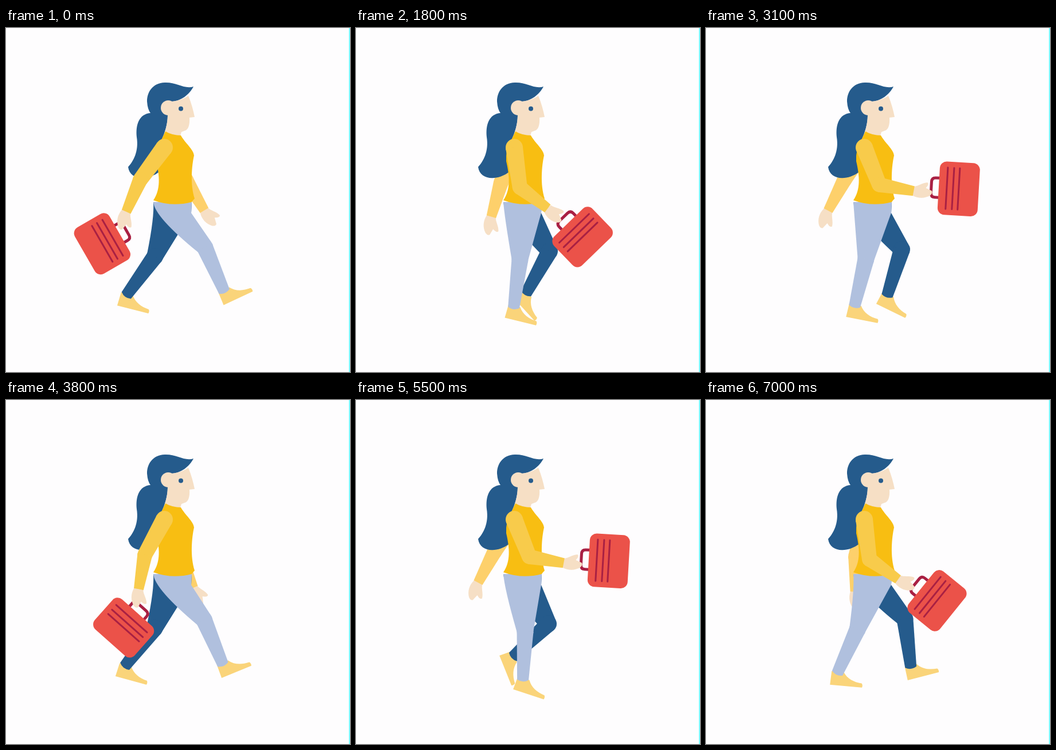
These frames come from a looping animation (600x599 px, 7100 ms). An HTML page with a canvas:

```html
<!DOCTYPE html>
<html lang="en">
<head>
<meta charset="utf-8">
<title>Walking with a suitcase</title>
<style>
  html, body { margin: 0; width: 100%; height: 100%; overflow: hidden; background: #fefdfe; }
  canvas { display: block; width: 600px; height: 599px; }
</style>
</head>
<body>
<canvas id="stage" width="600" height="599"></canvas>
<script>
const ctx = document.getElementById('stage').getContext('2d');
const NAVY = '#255b8c', PALE = '#b0c0de', SKIN = '#f6dfc5', SHOE = '#fad47a';
const SHIRT = '#f8be12', NEAR = '#f8cb4b', FAR = '#fdd06b', BAG = '#eb5249', TRIM = '#a92043';
const STEP = 100, STEPS = 71;

// Rows: time in steps, then thigh, shin and foot angle for the near and the far leg.
const half = [
  [0, 41.7, 23.8, -25, -20.8, -36.3, 14.3],
  [1.5, 33, 18, -5, -24, -50, 22],
  [3, 20, 9, 8, 5, -62, 50],
  [4.6, 3.4, -2.7, 18, 32.4, -47, 68],
  [5.4, -2.7, -7.4, 13.5, 34, -29.1, 47.5],
  [5.8, -7.5, -13.5, 11.3, 37.3, -17.6, 26],
  [7, -17.6, -24.7, 5, 42, 7, -14.5]
];
const swap = ([t, a, b, c, d, e, f]) => [7.2 + t * 0.74, d, e, f, a, b, c];
const LEGS = [
  ...half,
  [7.2, -20.8, -35.4, 17.8, 42.6, 20.5, -28.4],
  ...half.slice(1).map(swap),
  [12.6, ...half[0].slice(1)]
];

// Rows: time, near upper arm, forearm, wrist bend, bag, far upper arm, forearm.
const ARMS = [
  [0, -36.7, -23.7, 0, 150, 30.4, 31],
  [1, -38, -26, 0, 153, 31, 32],
  [6, 8, 52.8, 14, 46, -22, -16],
  [7, 22, 79.6, 0, 3.3, -32.3, -28],
  [9, 7.4, 55, 0, 39, -14.8, -1],
  [10, 7.4, 55, 0, 39, -14.8, -1],
  [12, -36.7, -23.7, 0, 150, 30.4, 31]
];

function pose(keys, time) {
  const t = time % keys[keys.length - 1][0];
  const i = keys.findIndex(k => k[0] > t);
  const a = keys[i - 1], b = keys[i];
  const u = (t - a[0]) / (b[0] - a[0]);
  return a.slice(1).map((v, j) => v + (b[j + 1] - v) * u);
}

const rad = d => d * Math.PI / 180;

// Angles of limbs are measured from straight down, forward positive.
const reach = ([x, y], len, deg) => [x + len * Math.sin(rad(deg)), y + len * Math.cos(rad(deg))];

function shape(color, d) {
  ctx.fillStyle = color;
  ctx.fill(new Path2D(d));
}

function dot(color, [x, y], r) {
  ctx.fillStyle = color;
  ctx.beginPath();
  ctx.arc(x, y, r, 0, 7);
  ctx.fill();
}

function at([x, y], deg, draw) {
  ctx.save();
  ctx.translate(x, y);
  ctx.rotate(rad(deg));
  draw();
  ctx.restore();
}

function side([x, y], r, deg) {
  return [x + r * Math.cos(rad(deg)), y - r * Math.sin(rad(deg))];
}

function taper(color, a, b, ra, rb, deg, bulge = 0) {
  const end = reach(b, bulge * 2, deg);
  shape(color, `M${side(a, -ra, deg)}L${side(b, -rb, deg)}Q${end} ${side(b, rb, deg)}L${side(a, ra, deg)}Z`);
}

function leg(color, thigh, shin, foot) {
  const knee = reach([290, 318], 85, thigh);
  const ankle = reach(knee, 84.5, shin);
  at(ankle, foot, () =>
    shape(SHOE, 'M-10-3L-11 21H45Q46.5 17 44 14C30 13 18 8 11-3Z'));
  shape(color, `M257 303Q259 329 ${side(knee, -14.5, thigh)}L${side(knee, 14.5, thigh)}L323 322L324 303Z`);
  dot(color, knee, 14.5);
  taper(color, knee, ankle, 14.5, 10, shin, 3);
}

function sleeve(color, shoulder, upper, fore) {
  const elbow = reach(shoulder, 70, upper);
  const wrist = reach(elbow, 61, fore);
  dot(color, shoulder, 15);
  taper(color, shoulder, elbow, 15, 13, upper);
  dot(color, elbow, 13);
  taper(color, elbow, wrist, 13, 8.5, fore);
  return wrist;
}

function hand(wrist, deg) {
  at(wrist, deg, () =>
    shape(SKIN, 'M-1-8C6-9 12-17 21-19Q25-17 20-9L31-6Q34-3 30 2C22 9 12 12-1 8Z'));
}

function suitcase(grip, deg) {
  at(grip, deg, () => {
    ctx.strokeStyle = TRIM;
    ctx.lineWidth = 5;
    ctx.lineCap = 'round';
    ctx.stroke(new Path2D('M14-17H6Q-1-17-1-10V10Q-1 17 6 17H14'));
    ctx.fillStyle = BAG;
    ctx.beginPath();
    ctx.roundRect(12, -46.5, 70, 93, 12);
    ctx.fill();
    ctx.lineWidth = 3;
    ctx.stroke(new Path2D('M26-36V36M37-36V36M47-36V36'));
  });
}

function hair() {
  shape(NAVY, `M327 102C311 107 297 94 277 95C255 96 246 112 246 128Q247 142 252 148
    C231 150 226 170 228 190C232 215 222 232 213 242C216 265 246 267 268 250
    C261 235 262 210 270 197C278 182 282 165 282 152L290 128C305 127 320 116 327 102Z`);
}

function head() {
  shape(SKIN, `M288 128C300 127 311 123 318 118Q325 135 329 155L320 156Q321 173 314 178
    L306 181L304 188Q288 190 277 181Q282 166 282 152Z`);
  dot(SKIN, [283, 139], 13);
  dot(NAVY, [305, 140.5], 4);
}

function torso() {
  shape(SHIRT, `M278 180Q290 187 305 187C312 200 327 211 328 222C324 240 321 272 329 297
    Q325 301 324 303Q290 312 257 300C270 281 268 258 262 232Q261 210 270 197Z`);
}

function draw(step) {
  const l = pose(LEGS, step);
  const [upper, fore, bend, bag, farUpper, farFore] = pose(ARMS, step);
  ctx.fillStyle = '#fefdfe';
  ctx.fillRect(0, 0, 600, 599);

  const elbow = reach([279, 205], 70, farUpper);
  hand(reach(elbow, 61, farFore), 90 - farFore);
  sleeve(FAR, [279, 205], farUpper, farFore);

  leg(NAVY, ...l.slice(3));
  leg(PALE, ...l.slice(0, 3));
  hair();
  head();
  torso();

  const shoulder = [276, 208];
  const wrist = reach(reach(shoulder, 70, upper), 61, fore);
  const palm = 90 - fore + bend, c = Math.cos(rad(palm)), s = Math.sin(rad(palm));
  suitcase([wrist[0] + 30 * c + 12 * s, wrist[1] + 30 * s - 12 * c], bag);
  hand(wrist, palm);
  sleeve(NEAR, shoulder, upper, fore);

  ctx.fillStyle = '#7ffbff';
  ctx.fillRect(598, 0, 2, 599);
}

const start = performance.now();
function tick() {
  draw(Math.floor((performance.now() - start) / STEP) % STEPS);
  requestAnimationFrame(tick);
}
tick();
</script>
</body>
</html>
```
